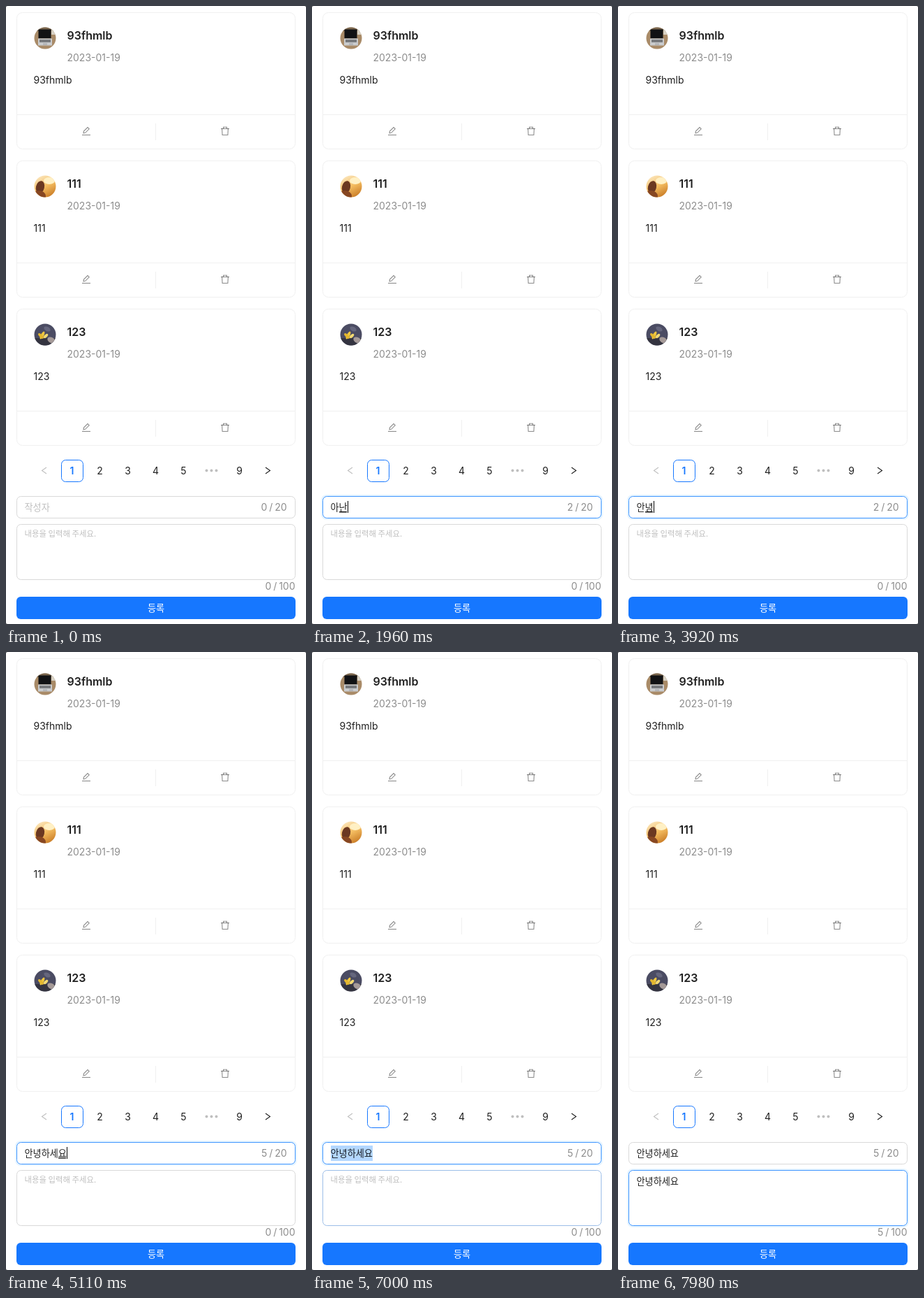
Recreate the animation shown at these times as an HTML page with a canvas. Size 430 by 884 pixels, loop 8 s.

```html
<!DOCTYPE html>
<html lang="ko">
<head>
<meta charset="utf-8">
<title>Guestbook</title>
<style>
  html, body { margin: 0; width: 100%; height: 100%; overflow: hidden; background: #fff; }
  canvas { display: block; width: 430px; height: 884px; }
</style>
</head>
<body>
<canvas id="stage"></canvas>
<script>
const W = 430, H = 884, LOOP = 8000;
const canvas = document.getElementById('stage');
const ctx = canvas.getContext('2d');
const ratio = window.devicePixelRatio || 1;
canvas.width = W * ratio;
canvas.height = H * ratio;

const LATIN = 'Inter, sans-serif';
const HANGUL = '"Noto Sans CJK KR", "Noto Sans CJK", sans-serif';
const INK = 'rgba(0,0,0,.88)', MUTED = 'rgba(0,0,0,.45)', FAINT = 'rgba(0,0,0,.25)';
const BLUE = '#1677ff', LINE = '#f0f0f0';
const GRAY_EDGE = [217, 217, 217], BLUE_EDGE = [64, 150, 255];
const SYLLABLE = 12.1, TEXT_X = 26.5;

const ENTRIES = ['93fhmlb', '111', '123'];
const GREETING = '안녕하세요';

// [time, value, whether the last syllable is still being composed]
const TYPING = [
  [0, '', false],
  [1400, 'ㅇ', true], [1470, '아', true], [1610, '안', true], [1750, '아나', true],
  [1890, '아난', true], [2030, '아나녀', true], [2170, '아나녕', true],
  [2520, '아나녀', true], [2730, '아나ㄴ', true], [2800, '아나', false],
  [3010, '아', false], [3080, '', false],
  [3290, 'ㅇ', true], [3360, '아', true], [3500, '안', true],
  [3640, '안ㄴ', true], [3780, '안녀', true], [3920, '안녕', true],
  [4340, '안녕ㅎ', true], [4410, '안녕하', true], [4550, '안녕핫', true],
  [4690, '안녕하세', true], [4830, '안녕하셍', true], [4900, GREETING, true],
  [5810, GREETING, false]
];

const between = (t, a, b) => t >= a && t < b;

function ramp(t, from, to) {
  const p = Math.min(1, Math.max(0, (t - from) / (to - from)));
  return p * p * (3 - 2 * p);
}

function text(str, x, y, { size = 14, weight = 400, color = INK, align = 'left', family = LATIN } = {}) {
  ctx.font = `${weight} ${size}px ${family}`;
  ctx.fillStyle = color;
  ctx.textAlign = align;
  ctx.fillText(str, x, y);
}

function hangul(str, x, y, options) {
  text(str, x, y, { size: 13.15, family: HANGUL, ...options });
}

function counter(str, x, y) {
  ctx.wordSpacing = '-1px';
  text(str, x, y, { color: MUTED, align: 'right' });
  ctx.wordSpacing = '0px';
}

function box(x, y, w, h, r, fill, stroke) {
  ctx.beginPath();
  ctx.roundRect(x, y, w, h, r);
  if (fill) { ctx.fillStyle = fill; ctx.fill(); }
  if (stroke) { ctx.strokeStyle = stroke; ctx.lineWidth = 1; ctx.stroke(); }
}

function rect(x, y, w, h, color) {
  ctx.fillStyle = color;
  ctx.fillRect(x, y, w, h);
}

function ellipse(x, y, rx, ry, color, turn = 0) {
  ctx.beginPath();
  ctx.ellipse(x, y, rx, ry, turn, 0, Math.PI * 2);
  ctx.fillStyle = color;
  ctx.fill();
}

function strokePath(points, color, width, close) {
  ctx.beginPath();
  points.forEach(([x, y]) => ctx.lineTo(x, y));
  if (close) ctx.closePath();
  ctx.strokeStyle = color;
  ctx.lineWidth = width;
  ctx.stroke();
}

// Each picture is drawn around its own centre.
const PICTURES = [
  () => {
    rect(-16, -16, 32, 32, '#a98b68');
    rect(-16, -16, 32, 6, '#7b674f');
    rect(9, -14, 6, 9, '#d8d2c5');
    rect(-9.5, -12.5, 18, 13, '#111214');
    rect(-10, 0.5, 20, 10, '#c9cbcd');
    rect(-8, 2, 16, 4, '#77797c');
    rect(-3, 7, 6, 3, '#b3b5b8');
  },
  () => {
    const glow = ctx.createLinearGradient(-8, -15, 8, 15);
    glow.addColorStop(0, '#fbe6bd');
    glow.addColorStop(0.5, '#f4bd61');
    glow.addColorStop(1, '#c97b25');
    rect(-16, -16, 32, 32, glow);
    ellipse(6, -8, 8, 5, '#fff0c4');
    ellipse(-7, 1, 6, 9, '#6b3821', 0.25);
    ellipse(-9, 14, 10, 8, '#874722');
  },
  () => {
    rect(-16, -16, 32, 32, '#4b4c63');
    rect(-16, 5, 32, 11, '#343440');
    ellipse(9, 8, 6, 4, '#a59a98', 0.5);
    ellipse(3, -8, 5, 3, '#65667d', 0.5);
    ellipse(-4, 1, 2.2, 6, '#efc63e', 0.5);
    ellipse(-6, 2, 2, 5, '#e4b72d', -0.8);
    ellipse(1, 2, 2, 4, '#f3da72', 0.8);
  }
];

function avatar(x, y, paint) {
  ctx.save();
  ctx.translate(x, y);
  ctx.beginPath();
  ctx.arc(0, 0, 15.5, 0, Math.PI * 2);
  ctx.clip();
  paint();
  ctx.restore();
}

function editIcon(x, y) {
  ctx.save();
  ctx.translate(x - 7, y - 7);
  strokePath([[3, 9.8], [3.5, 7.1], [9, 1.6], [11.2, 3.8], [5.7, 9.3]], MUTED, 1.1, true);
  strokePath([[1, 12.5], [13, 12.5]], MUTED, 1.1);
  ctx.restore();
}

function trashIcon(x, y) {
  ctx.save();
  ctx.translate(x - 7, y - 7);
  strokePath([[1, 3.5], [13, 3.5]], MUTED, 1.1);
  strokePath([[4.5, 3.5], [4.5, 1.3], [9.5, 1.3], [9.5, 3.5]], MUTED, 1.1);
  strokePath([[2.6, 3.5], [3.1, 12.5], [10.9, 12.5], [11.4, 3.5]], MUTED, 1.1);
  ctx.restore();
}

function card(name, index) {
  const y = 9 + index * 212;
  box(15.5, y + 0.5, 399, 195, 8, '#fff', LINE);
  rect(16, y + 146, 398, 1, LINE);
  rect(214, y + 159, 1, 24, LINE);
  avatar(56, y + 37, PICTURES[index]);
  text(name, 87.5, y + 39, { size: 16, weight: 600 });
  text('2023-01-19', 87.5, y + 70, { color: MUTED });
  text(name, 39.5, y + 102);
  editIcon(115, y + 170);
  trashIcon(314, y + 170);
}

function pagination() {
  strokePath([[58, 660], [51.5, 664.5], [58, 669]], FAINT, 1.1);
  strokePath([[372, 660], [378.5, 664.5], [372, 669]], INK, 1.1);
  box(79.5, 649.5, 31, 31, 6, '#fff', BLUE);
  text('1', 94.5, 670, { weight: 600, color: BLUE, align: 'center' });
  for (let n = 2; n <= 5; n++) text(String(n), 54.5 + n * 40, 670, { align: 'center' });
  for (let i = -1; i <= 1; i++) ellipse(294.5 + i * 7, 664.5, 2, 2, FAINT);
  text('9', 334.5, 670, { align: 'center' });
}

function field(y, h, edge, glow) {
  if (glow > 0) box(13, y - 2, 404, h + 4, 8, `rgba(5,145,255,${0.1 * glow})`);
  const color = GRAY_EDGE.map((c, i) => Math.round(c + (BLUE_EDGE[i] - c) * edge));
  box(15.5, y + 0.5, 399, h - 1, 6, '#fff', `rgb(${color})`);
}

function caret(syllables, y) {
  rect(Math.round(TEXT_X + 0.3 + syllables * SYLLABLE), y, 1, 17, '#000');
}

function nameField(t) {
  const blur = ramp(t, 7070, 7280);
  field(701, 32, ramp(t, 450, 650) * (1 - blur), ramp(t, 550, 710) * (1 - blur));
  const [, value, composing] = TYPING.findLast(step => step[0] <= t);
  const count = value.length;

  if (between(t, 5950, 7070)) rect(27, 706, 60, 22, '#b3d7ff');
  if (value) hangul(value, TEXT_X, 722);
  else hangul('작성자', TEXT_X, 722, { color: FAINT });
  if (composing) rect(Math.round(TEXT_X + (count - 1) * SYLLABLE), 723, 11, 1.5, INK);
  if (between(t, 560, 980) || between(t, 1400, 5460)) caret(count, 708);
  counter(`${count} / 20`, 402.5, 722);
}

function messageField(t) {
  const pasted = t >= 7280;
  field(741, 80, 0.5 * ramp(t, 6930, 7030) + 0.5 * ramp(t, 7030, 7200), ramp(t, 7070, 7350));
  if (pasted) hangul(GREETING, TEXT_X, 762);
  else hangul('내용을 입력해 주세요.', TEXT_X, 759, { size: 11.4, color: FAINT });
  if (between(t, 7070, 7770)) caret(pasted ? GREETING.length : 0, 748);
  counter(`${pasted ? GREETING.length : 0} / 100`, 414.5, 835);
}

function draw(t) {
  ctx.setTransform(ratio, 0, 0, ratio, 0, 0);
  rect(0, 0, W, H, '#666');
  box(0, 0, W, H, 2.5, '#fff');
  ENTRIES.forEach(card);
  pagination();
  nameField(t);
  messageField(t);
  box(15, 845, 400, 32, 6, BLUE);
  hangul('등록', 215, 866, { weight: 500, color: '#fff', align: 'center' });
}

const start = performance.now();
function tick() {
  draw((performance.now() - start) % LOOP);
  requestAnimationFrame(tick);
}
tick();
</script>
</body>
</html>
```
